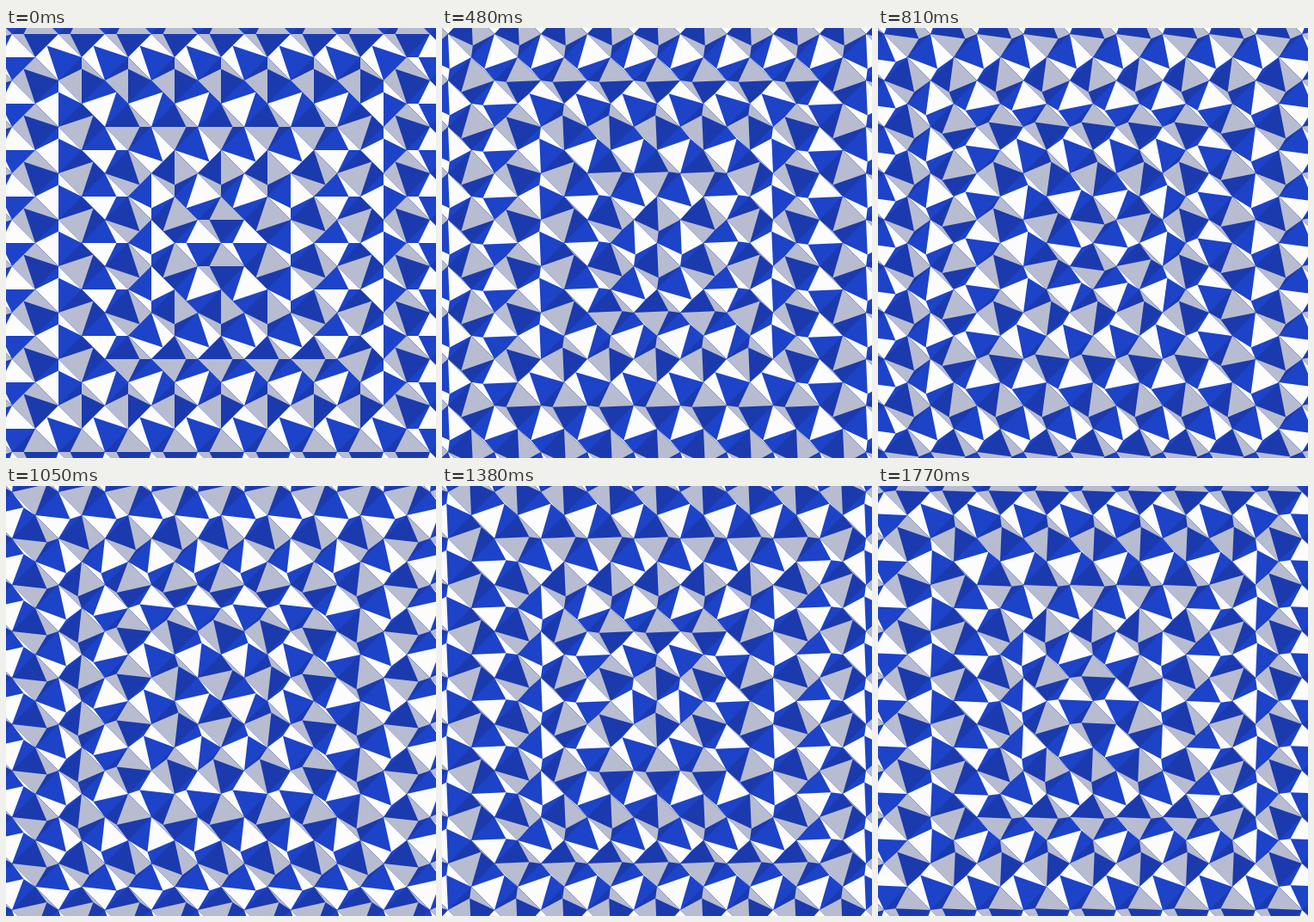
These frames come from a looping animation (500 px wide and 500 px high, 1.8 s). An HTML page with a canvas:

```html
<!DOCTYPE html>
<html lang="en">
<head>
<meta charset="utf-8">
<title>Ripple of pyramids</title>
<style>
  html, body { margin: 0; width: 100%; height: 100%; overflow: hidden; background: #1d43c8; }
  canvas { display: block; width: 500px; height: 500px; }
</style>
</head>
<body>
<canvas id="stage" width="500" height="500"></canvas>
<script>
const ctx = document.getElementById('stage').getContext('2d');
const MID = 250, UNIT = 27, REACH = 10;
const LOOP = 1800, STEP = 30;
const EVEN = { base: '#1b3aad', light: '#b8bcd0' };
const ODD = { base: '#1d43c8', light: '#fcfcfd' };

const mod = (n, m) => ((n % m) + m) % m;

// Square counterpart of the cosine; one turn is 8 units.
const squareCos = a => Math.max(-1, Math.min(1, 2 - Math.abs(mod(a + 4, 8) - 4)));

function fillShape(color, ...points) {
  ctx.fillStyle = color;
  ctx.beginPath();
  for (const [x, y] of points) ctx.lineTo(x, y);
  ctx.fill();
}

// A diamond seen from above, its tip circling along a square path.
function drawPyramid(i, j, turn) {
  const x = MID + i * UNIT, y = MID + j * UNIT;
  const ring = Math.max(Math.abs(i), Math.abs(j));
  const a = 5 - ring - 8 * turn;
  const tip = [x + squareCos(a) * UNIT / 2, y + squareCos(a - 2) * UNIT / 2];
  const top = [x, y - UNIT], right = [x + UNIT, y];
  const bottom = [x, y + UNIT], left = [x - UNIT, y];
  const { base, light } = i % 2 ? ODD : EVEN;
  fillShape(base, top, right, bottom, left);
  fillShape(light, top, right, tip);
  fillShape(light, bottom, left, tip);
}

function draw(ms) {
  const turn = Math.floor(ms % LOOP / STEP) * STEP / LOOP;
  ctx.fillStyle = ODD.base;
  ctx.fillRect(0, 0, 500, 500);
  for (let j = -REACH; j <= REACH; j++)
    for (let i = -REACH; i <= REACH; i++)
      if ((i + j) % 2) drawPyramid(i, j, turn);
}

function tick() {
  draw(performance.now());
  requestAnimationFrame(tick);
}
tick();
</script>
</body>
</html>
```
